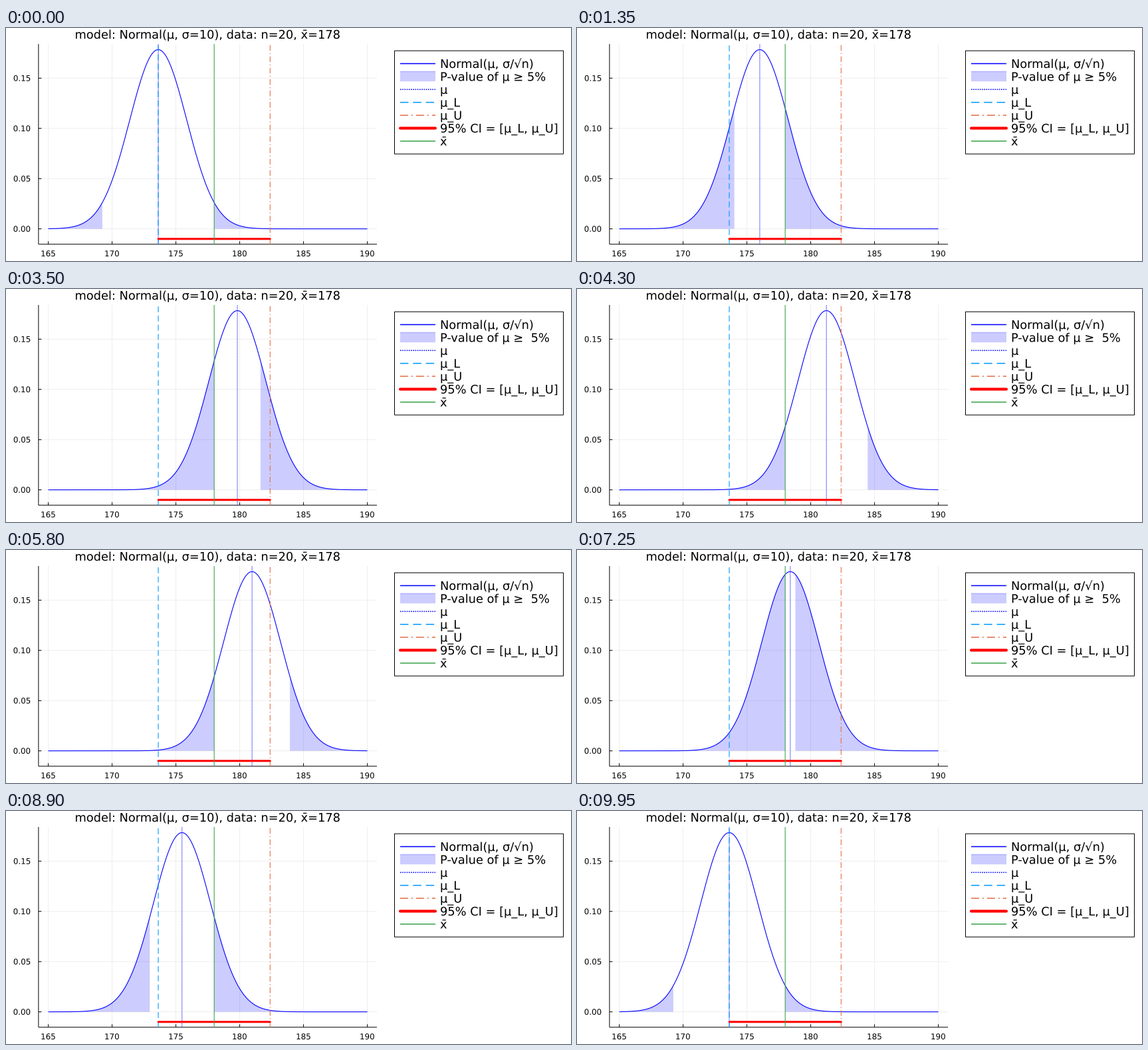
Animation, 850 px wide and 350 px high, one loop 10000 ms. Source, as a matplotlib script:

```python
import math

import matplotlib.pyplot as plt
import numpy as np
from matplotlib.animation import FuncAnimation
from matplotlib.patches import PathPatch, Polygon, Rectangle
from matplotlib.path import Path
from matplotlib.textpath import TextPath

W, H, DPI = 850, 350, 100
PT = 72 / DPI  # points per pixel
FRAMES, INTERVAL = 200, 50

XBAR, SIGMA, N = 178, 10, 20
SE = SIGMA / math.sqrt(N)
MU_L, MU_U = XBAR - 1.96 * SE, XBAR + 1.96 * SE
LO, HI = 165, 190

LEFT, RIGHT, TOP, BOTTOM = 48.9, 558, 24, 324.8
BLUE, SKY, ORANGE, GREEN = "#0000ff", "#009afa", "#e36f47", "#3da44d"
THIN, KEY_SCALE = 1.1, 1.4
DOT, DASH, DASHDOT = (1.15, 1.15), (8.9, 4.9), (8.5, 3.6, 1.4, 3.6)
BIG, SMALL = 17.8, 11.87

plt.rcParams["font.family"] = "DejaVu Sans"
plt.rcParams["path.snap"] = False

fig = plt.figure(figsize=(W / DPI, H / DPI), dpi=DPI, facecolor="white")
ax = fig.add_axes([0, 0, 1, 1])
ax.set_xlim(0, W)
ax.set_ylim(H, 0)
ax.axis("off")


def px(x):
    return 63.6 + 19.2 * (x - LO)


def py(y):
    return 301.7 - 1509 * y


def density(x, mu):
    return np.exp(-0.5 * ((x - mu) / SE) ** 2) / (SE * math.sqrt(2 * math.pi))


def line(xs, ys, color, width=THIN, dash=None, z=2, **kw):
    """Line in pixel coordinates; dash lengths are in pixels too."""
    kw.setdefault("solid_capstyle", "butt")
    art, = ax.plot(xs, ys, color=color, lw=width * PT, zorder=z,
                   dash_capstyle="butt", **kw)
    if dash:
        art.set_linestyle((0, [d / width for d in dash]))
    return art


def label(x, y, s, size, ha="left"):
    """Text as outlines, so that it sits at fractions of a pixel."""
    path = TextPath((0, 0), s, size=size)
    box = path.get_extents()
    x -= {"left": 0, "center": (box.x0 + box.x1) / 2, "right": box.x1}[ha]
    shape = Path(path.vertices * [1, -1] + [x, y], path.codes)
    return ax.add_patch(PathPatch(shape, fc="black", lw=0, zorder=9))


def vline(x, color, dash=None, z=4):
    return line([px(x)] * 2, [BOTTOM, TOP], color, dash=dash, z=z)


# Axes, grid and ticks
for t in range(LO, HI + 1, 5):
    line([px(t)] * 2, [BOTTOM, TOP], "#eeeeee", 1, z=0)
    line([px(t)] * 2, [BOTTOM, BOTTOM - 4.5], "black", 1)
    label(px(t), 343, str(t), SMALL, "center")
for t in (0, 0.05, 0.10, 0.15):
    line([LEFT, RIGHT], [py(t)] * 2, "#eeeeee", 1, z=0)
    line([LEFT, LEFT + 4.5], [py(t)] * 2, "black", 1)
    label(36.3, py(t) + 4.3, f"{t:.2f}", SMALL, "right")
line([LEFT, LEFT], [TOP, BOTTOM], "black", 1)
line([LEFT, RIGHT], [BOTTOM, BOTTOM], "black", 1)
label((LEFT + RIGHT) / 2, 16, "model: Normal(μ, σ=10), data: n=20, x̄=178", BIG, "center")

# Plot series
grid = np.linspace(LO, HI, 501)
curve = line(px(grid), py(0 * grid), BLUE, z=3)
tails = [Polygon([(0, 0)] * 3, fc=BLUE, alpha=0.2, lw=0, zorder=3) for _ in range(2)]
for tail in tails:
    ax.add_patch(tail)
mu_line = vline(MU_L, BLUE, DOT)
vline(MU_L, SKY, DASH, 5)
vline(MU_U, ORANGE, DASHDOT, 5)
line([px(MU_L), px(MU_U)], [py(-0.01)] * 2, "red", 3, z=6, solid_capstyle="round")
vline(XBAR, GREEN, z=7)

# Legend
ax.add_patch(Rectangle((584.5, 34.2), 254, 155, fc="white", ec="black", lw=PT, zorder=1))
KEYS = [
    ("Normal(μ, σ/√n)", BLUE, THIN, None),
    ("P-value of μ ≥ 5%", None, 0, None),
    ("μ", BLUE, THIN, DOT),
    ("μ_L", SKY, THIN, DASH),
    ("μ_U", ORANGE, THIN, DASHDOT),
    ("95% CI = [μ_L, μ_U]", "red", 3, None),
    ("x̄", GREEN, THIN, None),
]
texts = []
for i, (name, color, width, dash) in enumerate(KEYS):
    y = 53.5 + 19.4 * i
    texts.append(label(653, y + 6.5, name, BIG))
    if color:
        dash = dash and [d * KEY_SCALE for d in dash]
        cap = "round" if color == "red" else "butt"
        line([593, 646], [y, y], color, width * KEY_SCALE, dash, solid_capstyle=cap)
    else:
        ax.add_patch(Rectangle((593, y - 7.5), 53, 14.8, fc=BLUE, alpha=0.2, lw=0, zorder=2))
        line([593, 646], [y - 7.5] * 2, BLUE, THIN * KEY_SCALE, alpha=0.2)
        wide_text = label(653, y + 6.5, name.replace("≥ ", "≥  "), BIG)
        narrow_text = texts[-1]


def fill_tail(tail, a, b, mu):
    x = np.linspace(a, b, 200)
    top = np.column_stack([px(x), py(density(x, mu))])
    tail.set_xy(np.vstack([[px(a), py(0)], top, [px(b), py(0)]]))


def update(i):
    half = FRAMES // 2
    step = i if i < half else FRAMES - 1 - i
    mu = MU_L + (MU_U - MU_L) * step / (half - 1)
    curve.set_ydata(py(density(grid, mu)))
    mu_line.set_xdata([px(mu)] * 2)
    a, b = sorted((XBAR, 2 * mu - XBAR))
    fill_tail(tails[0], LO, a, mu)
    fill_tail(tails[1], b, HI, mu)
    wide_text.set_visible(mu > XBAR)
    narrow_text.set_visible(mu <= XBAR)
    return [curve, mu_line, wide_text, narrow_text, *tails]


anim = FuncAnimation(fig, update, frames=FRAMES, interval=INTERVAL, repeat=True, blit=False)
plt.show()
```
